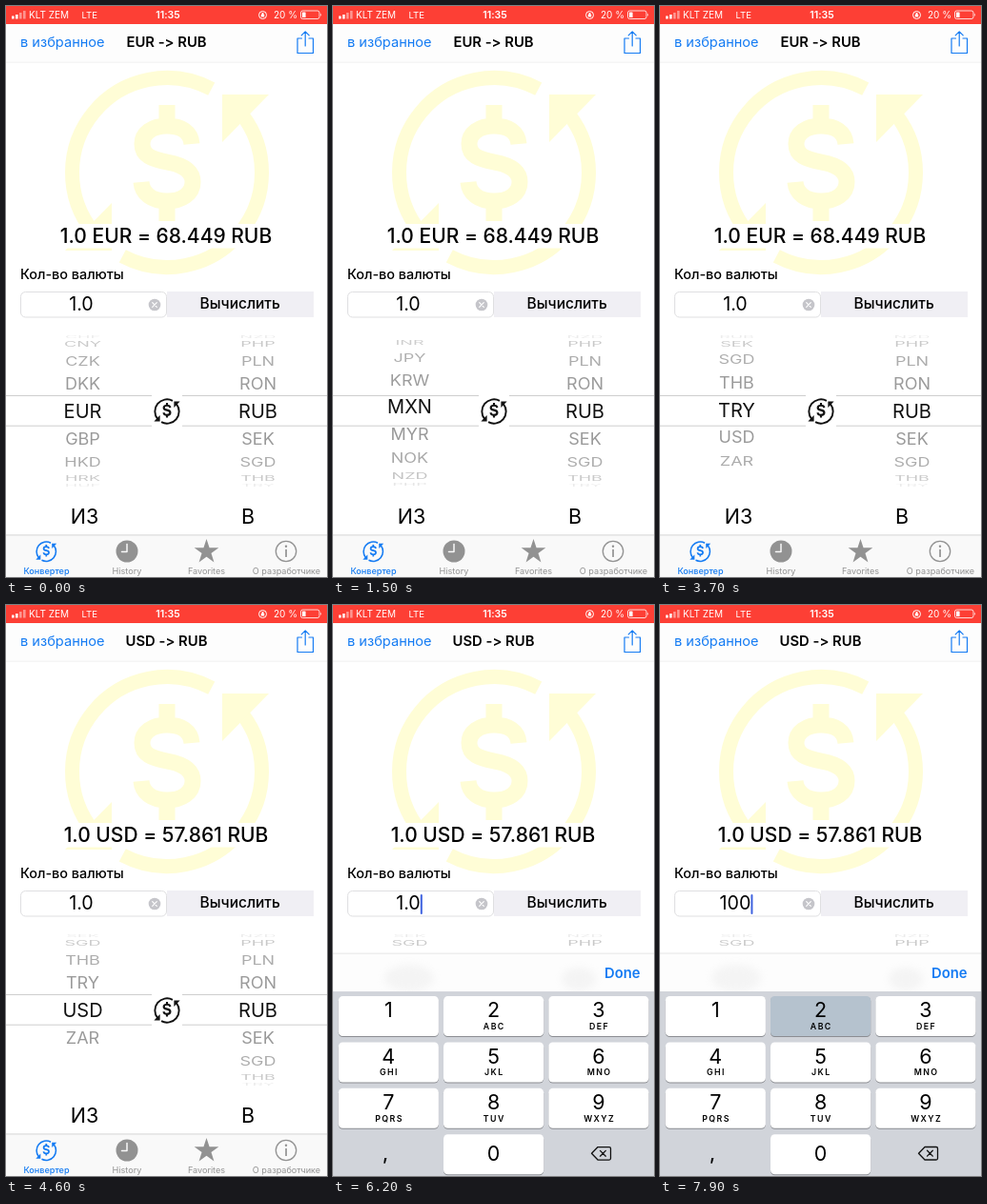
These frames come from a looping animation (337 px wide and 600 px high, 8000 ms). An HTML page:

```html
<!DOCTYPE html>
<html lang="ru">
<head>
<meta charset="utf-8">
<title>Конвертер</title>
<style>
  html, body { margin: 0; width: 100%; height: 100%; overflow: hidden; background: #fff; }
  svg { display: block; width: 100vw; height: 100vh; font-family: Inter, "Open Sans", sans-serif;
        font-variant-ligatures: none; font-feature-settings: "calt" 0, "liga" 0; }
  .mid { text-anchor: middle; }
  .blue { fill: #147bf3; }
  .line { fill: none; stroke-linecap: round; stroke-linejoin: round; }
</style>
</head>
<body>
<svg viewBox="0 0 337 600" xmlns="http://www.w3.org/2000/svg">
  <defs>
    <symbol id="swap" viewBox="-110 -110 220 220" overflow="visible">
      <g fill="none" stroke="currentColor" stroke-width="15">
        <path id="arc"/>
        <path id="arc2" transform="rotate(180)"/>
        <path stroke-width="17" d="M26-30C25-43 15-49 0-49C-16-49-26-41-26-30C-26-18-16-14 0-11C17-8 27-2 27 10C27 22 16 30 0 30C-16 30-26 22-27 10M0-71V-47M0 28V51"/>
      </g>
      <g fill="currentColor">
        <path d="M58-82H107L58-32Z"/>
        <path d="M-58 82H-107L-58 32Z"/>
      </g>
    </symbol>
    <clipPath id="band"><rect y="410" width="337" height="31"/></clipPath>
    <clipPath id="rest"><path d="M0 345H337V409H0ZM0 442H337V507H0Z"/></clipPath>
    <filter id="soft" x="-50%" y="-50%" width="200%" height="200%"><feGaussianBlur stdDeviation="4"/></filter>
  </defs>

  <rect width="337" height="600" fill="#fff"/>

  <!-- status bar -->
  <rect width="337" height="19" fill="#fd3f35"/>
  <g fill="#fff" font-size="10">
    <path d="M6 10.5h2.6v3H6zM10 9h2.6v4.5H10z"/>
    <path opacity=".45" d="M14 7h2.6v6.5H14zM18 5h2.6v8.5H18z"/>
    <text x="24" y="13">KLT ZEM</text>
    <text x="79.5" y="13" font-size="9.6">LTE</text>
    <text class="mid" x="170" y="13.2" font-weight="600" font-size="10.6">11:35</text>
    <text x="281" y="13">20 %</text>
    <circle cx="269.5" cy="9.5" r="4" fill="none" stroke="#fff"/>
    <path d="M267.8 9h3.4v2.6h-3.4zM268.4 9v-1a1.1 1.1 0 0 1 2.2 0v1z"/>
    <rect x="309.5" y="5" width="19.5" height="8.5" rx="2" fill="none" stroke="#fff" stroke-opacity=".8"/>
    <rect x="311" y="6.5" width="3.6" height="5.5" rx=".6"/>
    <path d="M330.3 7.6q1.8 1.6 0 3.4z"/>
  </g>

  <!-- navigation -->
  <rect y="19" width="337" height="40" fill="#fdfdfd"/>
  <rect y="58.8" width="337" height=".6" fill="#e6e6e6"/>
  <text class="blue" x="15" y="43" font-size="14.6">в избранное</text>
  <text class="mid" id="title" x="168.5" y="43" font-size="14.8" font-weight="600"></text>
  <path class="line" stroke="#147bf3" stroke-width="1.2" d="M310.5 34H306V49.5H322.5V34H318M314.2 42V27M310.2 30.8L314.2 26.8L318.2 30.8"/>

  <!-- conversion -->
  <use href="#swap" x="59" y="65" width="220" height="220" color="#fffdd6"/>
  <rect x="15" y="229" width="308" height="25.5" fill="#fff"/>
  <text class="mid" id="result" x="168" y="249" font-size="21" font-weight="500"></text>
  <text x="15" y="287" font-size="14.4" font-weight="500">Кол-во валюты</text>
  <rect x="15.5" y="300.5" width="153" height="26.5" rx="5" fill="#fff" stroke="#dfdfe1"/>
  <text class="mid" id="amount" x="79" y="320" font-size="19.7"></text>
  <rect id="caret" y="304" width="2" height="21" rx="1" fill="#3f63e0"/>
  <circle cx="156" cy="314" r="6.3" fill="#c5c5ca"/>
  <path class="line" stroke="#fff" stroke-width="1.2" d="M153.7 311.7l4.6 4.6m0-4.6l-4.6 4.6"/>
  <rect x="169" y="300" width="154" height="27" fill="#f0eff4"/>
  <text class="mid" x="245.7" y="317.8" font-size="15.5" font-weight="500">Вычислить</text>

  <!-- pickers -->
  <path stroke="#c9c9c9" stroke-width=".9" d="M0 409.5H153M185 409.5H337M0 441.2H153M185 441.2H337"/>
  <g id="rows" clip-path="url(#rest)" font-size="18" class="mid"></g>
  <g id="focus" clip-path="url(#band)" font-size="20" class="mid"></g>
  <use href="#swap" x="155" y="412" width="28" height="28" color="#111"/>
  <text class="mid" x="82.5" y="543.5" font-size="21.5">ИЗ</text>
  <text class="mid" x="254" y="543.5" font-size="21.5">В</text>

  <!-- tabs -->
  <rect y="556" width="337" height="44" fill="#f9f9f9"/>
  <rect y="555.6" width="337" height=".7" fill="#c4c4c4"/>
  <use href="#swap" x="31" y="562" width="22.5" height="22.5" color="#147bf3"/>
  <g fill="#929292">
    <circle cx="127" cy="573" r="11.5"/>
    <path class="line" stroke="#f9f9f9" stroke-width="1.5" d="M127 565.5V573.5H121.5"/>
    <path id="star"/>
    <circle cx="294" cy="573" r="10.7" fill="none" stroke="#929292" stroke-width="1.3"/>
    <path d="M293.2 571h1.7v8h-1.7z"/>
    <circle cx="294" cy="567.7" r="1.2"/>
    <g class="mid" font-size="9.1">
      <text class="blue" x="42.5" y="597" font-weight="500">Конвертер</text>
      <text x="127" y="597">History</text>
      <text x="210.5" y="597">Favorites</text>
      <text x="294.5" y="597">О разработчике</text>
    </g>
  </g>

  <!-- keyboard, laid out at its open position -->
  <g id="board">
    <rect y="366" width="337" height="40" fill="#fdfdfd"/>
    <g fill="#dadada" opacity=".25" filter="url(#soft)">
      <ellipse cx="80" cy="392" rx="26" ry="14"/>
      <ellipse cx="258" cy="393" rx="18" ry="12"/>
    </g>
    <rect y="365.7" width="337" height=".6" fill="#d4d4d4"/>
    <text x="285" y="391.5" class="blue" font-size="14.8" font-weight="600">Done</text>
    <rect y="406" width="337" height="194" fill="#d1d4da"/>
    <g id="keys" class="mid"></g>
    <text class="mid" x="55" y="583.3" font-size="20" font-weight="500">,</text>
    <path class="line" stroke="#111" stroke-width="1.3" d="M278 569.5H290Q291.5 569.5 291.5 571V581.5Q291.5 583 290 583H278L271.5 576.2ZM280.5 573.3l5.8 5.8m0-5.8l-5.8 5.8"/>
  </g>
</svg>

<script>
const LOOP = 8000, STEP = 100;
const CODES = ("AUD BGN BRL CAD CHF CNY CZK DKK EUR GBP HKD HRK HUF IDR ILS INR JPY KRW " +
  "MXN MYR NOK NZD PHP PLN RON RUB SEK SGD THB TRY USD ZAR").split(" ");
const $ = id => document.getElementById(id);

function add(parent, tag, attrs, text = "") {
  const el = document.createElementNS("http://www.w3.org/2000/svg", tag);
  for (const k in attrs) el.setAttribute(k, attrs[k]);
  el.textContent = text;
  return parent.appendChild(el);
}

function polar(r, deg) {
  const a = deg * Math.PI / 180;
  return `${(r * Math.cos(a)).toFixed(2)} ${(-r * Math.sin(a)).toFixed(2)}`;
}

// icon shapes
for (const id of ["arc", "arc2"])
  $(id).setAttribute("d", `M${polar(99.5, 62)}A99.5 99.5 0 0 0 ${polar(99.5, 219)}`);
$("star").setAttribute("transform", "translate(210.5 573.5)");
$("star").setAttribute("d", "M" + Array.from({ length: 10 },
  (_, i) => polar(i % 2 ? 5.2 : 13.5, 90 + i * 36)).join("L") + "Z");

// keypad
const keys = {};
["1", "2 ABC", "3 DEF", "4 GHI", "5 JKL", "6 MNO", "7 PQRS", "8 TUV", "9 WXYZ", "", "0"].forEach((label, i) => {
  if (!label) return;
  const [digit, letters] = label.split(" ");
  const x = 5.7 + (i % 3) * 110.3, y = 411 + Math.floor(i / 3) * 48.4, cx = x + 52.6;
  const box = { x, width: 105.2, height: 42, rx: 4.5 };
  add($("keys"), "rect", { ...box, y: y + 1, fill: "#8b8d92" });
  keys[digit] = add($("keys"), "rect", { ...box, y });
  add($("keys"), "text", { x: cx, y: y + (digit === "0" ? 28 : 22.3), "font-size": 21.5 }, digit);
  if (letters) add($("keys"), "text",
    { x: cx + .7, y: y + 35, "font-size": 8.8, "font-weight": 600, "letter-spacing": 1.4 }, letters);
});

// picker drums
function drum(x) {
  const items = CODES.map(code => [
    add($("rows"), "text", {}, code),
    add($("focus"), "text", { fill: "#111" }, code)
  ]);
  return pos => items.forEach(([row, focus], i) => {
    const a = (i - pos) * 21.5 * Math.PI / 180, c = Math.cos(a);
    const shown = Math.abs(a) < 1.54, y = 426 + 78 * Math.sin(a);
    row.style.display = focus.style.display = shown ? "" : "none";
    if (!shown) return;
    row.setAttribute("transform", `translate(${x} ${y}) scale(1 ${Math.max(.18, c)}) translate(0 6.5)`);
    row.setAttribute("opacity", .05 + .37 * c);
    focus.setAttribute("transform", `translate(${x} ${y + 7.2})`);
  });
}
const from = drum(80.5), to = drum(264.5);
to(CODES.indexOf("RUB"));

// flicks of the left drum: time, row
const SPIN = [[500, 8], [1500, 18.17], [2500, 27.22], [3200, 28.75], [3700, 29.05], [4400, 30]];
const slope = i => (SPIN[i + 1][1] - SPIN[i][1]) / (SPIN[i + 1][0] - SPIN[i][0]);
const tangent = i => {
  if (i === 0 || i === SPIN.length - 1) return 0;
  const a = slope(i - 1), b = slope(i);
  return 2 * a * b / (a + b);
};

function spin(t) {
  const last = SPIN.length - 1;
  if (t <= SPIN[0][0]) return SPIN[0][1];
  if (t >= SPIN[last][0]) return SPIN[last][1];
  const i = SPIN.findIndex(p => p[0] > t) - 1;
  const [t0, p0] = SPIN[i], [t1, p1] = SPIN[i + 1], d = t1 - t0, u = (t - t0) / d;
  const h = u * u * (3 - 2 * u);
  return p0 + (p1 - p0) * h + d * u * (1 - u) * (tangent(i) * (1 - u) - tangent(i + 1) * u);
}

// damped spring lift of the keyboard
function lift(t) {
  const x = Math.max(0, t - 5740) * .0229;
  return 1 - (1 + x) * Math.exp(-x);
}

const TYPED = [[0, "1.0"], [7100, "1."], [7200, "1"], [7300, "10"], [7600, "100"]];
const PRESSED = { 7300: "0", 7600: "0", 7900: "2" };

function render(t) {
  const usd = t >= 4500, open = t >= 5800;
  from(spin(t));
  $("title").textContent = usd ? "USD -> RUB" : "EUR -> RUB";
  $("result").textContent = usd ? "1.0 USD = 57.861 RUB" : "1.0 EUR = 68.449 RUB";
  $("amount").textContent = TYPED.filter(s => s[0] <= t).pop()[1];
  $("caret").style.display = open ? "" : "none";
  $("caret").setAttribute("x", 79 + $("amount").getComputedTextLength() / 2);
  $("board").style.display = open ? "" : "none";
  $("board").setAttribute("transform", `translate(0 ${234 * (1 - lift(t))})`);
  for (const k in keys) keys[k].setAttribute("fill", PRESSED[t] === k ? "#b5c2ce" : "#fff");
}

const start = performance.now();
function tick() {
  const t = (performance.now() - start) % LOOP;
  render(Math.floor(t / STEP) * STEP);
  requestAnimationFrame(tick);
}
tick();
</script>
</body>
</html>
```
